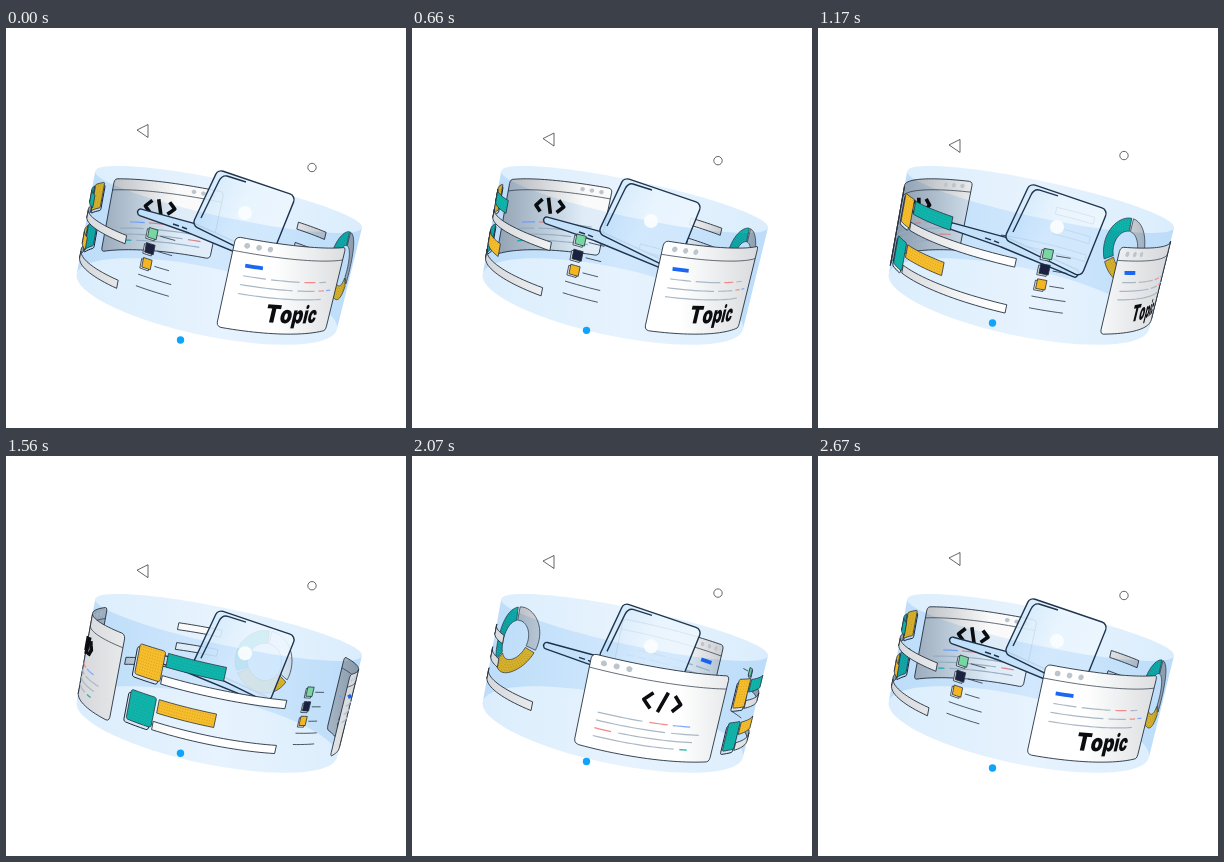
Recreate the animation shown at these times as an HTML page with a canvas. Size 400 by 400 pixels, loop 2700 ms.

```html
<!DOCTYPE html>
<html>
<head>
<meta charset="utf-8">
<style>
  html, body { margin: 0; width: 100%; height: 100%; overflow: hidden; background: #fff; }
  canvas { display: block; width: 400px; height: 400px; }
</style>
</head>
<body>
<canvas id="stage"></canvas>
<script>
const canvas = document.getElementById('stage');
const ctx = canvas.getContext('2d');
const dpr = window.devicePixelRatio || 1;
canvas.width = canvas.height = 400 * dpr;

const LOOP = 2700, RISE = 1215;
const RAD = Math.PI / 180;
const R = 133, DEPTH = 850, FLAT = 26, SKEW = 0.18;
const TILT = { cos: Math.cos(12 * RAD), sin: Math.sin(12 * RAD) };
const CENTER = { x: 212, y: 221 };
const INK = '#26323f', NAVY = '#17263f';
const TEAL = '#0fb5ac', YELLOW = '#f7bd2b', GREY = '#aab8c6', RED = '#f08a8a', BLUE = '#7fa8ff';

// Ring angle in degrees (0 = nearest) and height to stage coordinates.
function project(angle, h) {
  const a = angle * RAD;
  const psi = a + SKEW * Math.cos(a);
  const s = DEPTH / (DEPTH - R * Math.cos(psi) + 0.2 * h);
  const x = R * Math.sin(psi) * s;
  const y = (h * 0.98 + FLAT * Math.cos(psi)) * s;
  return [CENTER.x + TILT.cos * x - TILT.sin * y, CENTER.y + TILT.sin * x + TILT.cos * y];
}

const wrap = a => ((a + 180) % 360 + 360) % 360 - 180;
const toDeg = units => units / R / RAD;

// Half of the ring being drawn, and where the current item sits on it.
let side, origin;
const half = {
  front: { mid: 0, limit: 80, edge: '#d6d8db', face: '#ffffff' },
  back: { mid: 180, limit: 100, edge: '#a0a6ad', face: '#fafafa' }
};

function place(angle, middle) {
  origin = wrap(angle + toDeg(middle) - side.mid) - toDeg(middle);
}
const offset = x => origin + toDeg(x);
const visible = x => Math.abs(offset(x)) < side.limit;
function point(x, h) {
  const d = Math.max(-side.limit, Math.min(side.limit, offset(x)));
  return project(d + side.mid, h);
}

function trace(points, closed) {
  if (!points.some(p => visible(p[0]))) return false;
  ctx.beginPath();
  const last = closed ? points.length : points.length - 1;
  ctx.moveTo(...point(...points[0]));
  for (let i = 0; i < last; i++) {
    const [x0, h0] = points[i], [x1, h1] = points[(i + 1) % points.length];
    const steps = Math.max(1, Math.ceil(Math.abs(x1 - x0) / 5));
    for (let k = 1; k <= steps; k++) {
      ctx.lineTo(...point(x0 + (x1 - x0) * k / steps, h0 + (h1 - h0) * k / steps));
    }
  }
  if (closed) ctx.closePath();
  return true;
}

function shape(points, fill, stroke, width = 1) {
  if (!trace(points, true)) return;
  if (fill) { ctx.fillStyle = fill; ctx.fill(); }
  if (stroke) { ctx.strokeStyle = stroke; ctx.lineWidth = width; ctx.stroke(); }
}

function line(x0, x1, h, color, width = 1.2) {
  if (!trace([[x0, h], [x1, h]])) return;
  ctx.strokeStyle = color;
  ctx.lineWidth = width;
  ctx.stroke();
}

function box(x0, h0, x1, h1, r = 0) {
  if (!r) return [[x0, h0], [x1, h0], [x1, h1], [x0, h1]];
  const points = [];
  const corners = [[x1 - r, h0 + r, -90], [x1 - r, h1 - r, 0], [x0 + r, h1 - r, 90], [x0 + r, h0 + r, 180]];
  for (const [x, h, from] of corners) {
    for (let a = from; a <= from + 90; a += 30) {
      points.push([x + r * Math.cos(a * RAD), h + r * Math.sin(a * RAD)]);
    }
  }
  return points;
}

function arc(h, r, from, to) {
  const points = [];
  for (let a = from; a <= to; a += 5) points.push([r * Math.cos(a * RAD), h + r * Math.sin(a * RAD)]);
  return points;
}

function surface() {
  const g = ctx.createLinearGradient(76, 0, 350, 0);
  g.addColorStop(0, side.edge);
  g.addColorStop(0.35, side.face);
  g.addColorStop(0.7, side.face);
  g.addColorStop(1, side.edge);
  return g;
}

function textured(points, color, x0, x1, h0, h1) {
  shape(points, color, INK, 0.8);
  ctx.save();
  ctx.setLineDash([1, 1.6]);
  for (let h = h0 + 2; h < h1; h += 2.5) line(x0 + 1, x1 - 1, h, 'rgba(60,70,40,.28)', 0.8);
  ctx.restore();
}

function panelFrame(angle) {
  place(angle, 0);
  shape(box(-66, -40, 66, 40, 4), surface(), INK, 0.9);
  line(-66, 66, -28, INK, 0.7);
  for (const x of [-55, -44.5, -34]) shape(box(x - 2.5, -36.5, x + 2.5, -31.5, 2.5), '#bcc4cc');
}

function word(text, x, h, size) {
  ctx.font = `900 ${size}px Inter, "Liberation Sans", sans-serif`;
  ctx.fillStyle = '#0b0d10';
  for (const letter of text) {
    const w = ctx.measureText(letter).width, mid = x + w / 2;
    if (visible(mid)) {
      const p = point(mid, h), px = point(mid + 1, h), py = point(mid, h + 1);
      ctx.save();
      ctx.transform(px[0] - p[0], px[1] - p[1], py[0] - p[0], py[1] - p[1], p[0], p[1]);
      ctx.fillText(letter, -w / 2, 0);
      ctx.restore();
    }
    x += w;
  }
}

function topicPanel(angle) {
  panelFrame(angle);
  line(-53, -37, -17, '#1967f2', 3.8);
  line(-53, -32, -8, GREY);
  line(-27, 4, -8, GREY);
  line(10, 25, -8, RED);
  line(31, 42, -8, GREY);
  line(-54, -2, 0, GREY);
  line(4, 27, 0, GREY);
  line(33, 42, 0, RED);
  line(46, 54, 0, BLUE);
  line(-54, 40, 8, GREY);
  word('Topic', -25, 30, 22.5);
}

function codePanel(angle) {
  panelFrame(angle);
  const strokes = [[[-10, -18], [-17, -11], [-10, -4]], [[3, -20], [-3, -2]], [[10, -18], [17, -11], [10, -4]]];
  for (const s of strokes) {
    if (!s.every(p => visible(p[0])) || !trace(s)) continue;
    ctx.strokeStyle = '#0b0d10';
    ctx.lineWidth = 3.6;
    ctx.stroke();
  }
  line(-52, -14, 8, GREY);
  line(-8, 9, 8, RED);
  line(14, 32, 8, BLUE);
  line(-52, 8, 15, GREY);
  line(14, 44, 15, GREY);
  line(-52, -38, 22, RED);
  line(-32, 38, 22, GREY);
  line(-52, 20, 29, GREY);
  line(26, 34, 29, TEAL);
}

function list(angle) {
  place(angle, 0);
  ['#78d6a0', '#1b2140', '#f5b51f'].forEach((color, i) => {
    const h = -25 + i * 13.4;
    shape(box(-5.5, h - 3, 2.5, h + 5.5), '#e8eef4', INK, 0.8);
    shape(box(-4, h - 4.5, 4, h + 4), color, INK, 0.8);
    line(7, 20, h, INK, 0.8);
  });
  line(-6, 24, 13, INK, 0.8);
  line(-6, 24, 23.5, INK, 0.8);
}

function bars(angle) {
  place(angle, 55);
  [[-23, YELLOW, TEAL], [18, TEAL, YELLOW]].forEach(([h, icon, bar]) => {
    shape(box(-14, h - 11, 10, h + 16, 2), '#dbe7ef', NAVY, 1);
    textured(box(-12, h - 14, 12, h + 13, 2), icon, -12, 12, h - 14, h + 13);
    textured(box(14.5, h - 13, 63, h - 1), bar, 14.5, 63, h - 13, h - 1);
    shape(box(13, h + 7, 123, h + 14.5), surface(), INK, 0.9);
  });
}

function donut(angle) {
  place(angle, 0);
  const outer = 36, inner = 21.5, h = -4;
  const sector = (from, to, fill) =>
    shape([...arc(h, outer, from, to), ...arc(h, inner, from, to).reverse()], fill, INK, 0.7);
  sector(160, 270, surface());
  sector(-85, 30, TEAL);
  sector(35, 155, YELLOW);
  ctx.save();
  ctx.setLineDash([1, 1.7]);
  for (let r = inner + 3; r < outer; r += 3) {
    if (!trace(arc(h, r, -82, 152))) continue;
    ctx.strokeStyle = 'rgba(60,70,40,.28)';
    ctx.lineWidth = 1;
    ctx.stroke();
  }
  ctx.restore();
}

function rows(angle) {
  place(angle, 50);
  [[-24, 48], [-1, 46], [20.5, 102]].forEach(([h, w]) => {
    shape(box(0, h - 4, w, h + 4), surface(), INK, 0.9);
  });
}

function drawHalf(name, turn) {
  side = half[name];
  rows(130.5 + turn);
  donut(106 + turn);
  codePanel(221.5 + turn);
  topicPanel(23.5 + turn);
  list(-34 + turn);
  bars(-97.5 + turn);
}

// Tinted glass: multiplying keeps dark ink behind it crisp.
function wall(from, to) {
  ctx.beginPath();
  for (let a = from; a <= to; a += 4) ctx.lineTo(...project(a, -54));
  for (let a = to; a >= from; a -= 4) ctx.lineTo(...project(a, 50));
  ctx.closePath();
  const g = ctx.createLinearGradient(72, 0, 354, 0);
  g.addColorStop(0, '#dbedfc');
  g.addColorStop(0.5, '#e7f3fe');
  g.addColorStop(1, '#dbedfc');
  ctx.save();
  ctx.globalCompositeOperation = 'multiply';
  ctx.fillStyle = g;
  ctx.fill();
  ctx.restore();
}

function rounded(points, r) {
  const n = points.length, [a, b] = [points[n - 1], points[0]];
  ctx.beginPath();
  ctx.moveTo((a[0] + b[0]) / 2, (a[1] + b[1]) / 2);
  points.forEach((p, i) => ctx.arcTo(...p, ...points[(i + 1) % n], r));
  ctx.closePath();
}

function laptop(dy) {
  ctx.save();
  ctx.translate(0, dy);
  ctx.strokeStyle = '#20364f';
  ctx.lineWidth = 1.4;

  rounded([[131, 180], [190, 196], [262, 229], [258, 236], [183, 205], [132, 187]], 3);
  ctx.fillStyle = '#dceefb';
  ctx.fill();
  ctx.stroke();
  ctx.beginPath();
  ctx.moveTo(167, 196); ctx.lineTo(173, 198);
  ctx.moveTo(176, 199); ctx.lineTo(181, 201);
  ctx.stroke();

  rounded([[212, 141.5], [290, 168], [263, 235], [186, 197]], 6);
  const g = ctx.createLinearGradient(200, 165, 275, 200);
  g.addColorStop(0, 'rgba(212,234,251,.9)');
  g.addColorStop(0.45, 'rgba(232,244,254,.9)');
  g.addColorStop(1, 'rgba(236,246,255,.9)');
  ctx.fillStyle = g;
  ctx.fill();
  ctx.stroke();

  ctx.beginPath();
  ctx.moveTo(240, 154);
  ctx.lineTo(221, 148);
  ctx.quadraticCurveTo(216, 147, 213, 153);
  ctx.lineTo(195, 190);
  ctx.stroke();
  ctx.restore();
}

function logoDisc(dy) {
  ctx.beginPath();
  ctx.arc(239, 185 + dy, 7, 0, 7);
  ctx.fillStyle = 'rgba(252,254,255,.9)';
  ctx.fill();
}

function floaters(lift, dotLift) {
  const ty = 103 + 15 * lift;
  ctx.strokeStyle = '#333';
  ctx.lineWidth = 0.75;
  ctx.beginPath();
  ctx.moveTo(131, ty - 1);
  ctx.lineTo(142, ty - 6.5);
  ctx.lineTo(142, ty + 6.5);
  ctx.closePath();
  ctx.stroke();
  ctx.beginPath();
  ctx.arc(306, 139.5 - 12 * lift, 4.2, 0, 7);
  ctx.stroke();
  ctx.beginPath();
  ctx.arc(174.5, 312 - 17 * dotLift, 3.7, 0, 7);
  ctx.fillStyle = '#10a3fa';
  ctx.fill();
}

// Cubic Bezier easing (1, 0, .84, 1), solved by bisection.
function ease(t) {
  let lo = 0, hi = 1;
  for (let i = 0; i < 30; i++) {
    const u = (lo + hi) / 2, v = 1 - u;
    if (3 * v * v * u + 3 * v * u * u * 0.84 + u * u * u < t) lo = u; else hi = u;
  }
  return lo * lo * (3 - 2 * lo);
}

// Smooth rise, then a fall of the given length, then rest.
function bob(t, fall) {
  const phase = t < RISE ? t / RISE : Math.min(2, 1 + (t - RISE) / fall);
  return (1 - Math.cos(Math.PI * phase)) / 2;
}

function draw(time) {
  const t = time % LOOP;
  const turn = 360 * ease(t / LOOP);
  const lift = bob(t, RISE), slowLift = bob(t, LOOP - RISE);
  ctx.setTransform(dpr, 0, 0, dpr, 0, 0);
  ctx.fillStyle = '#fff';
  ctx.fillRect(0, 0, 400, 400);
  ctx.lineJoin = 'round';
  wall(80, 280);
  drawHalf('back', turn);
  laptop(14 * slowLift);
  wall(-80, 80);
  logoDisc(14 * slowLift);
  drawHalf('front', turn);
  floaters(lift, slowLift);
}

const start = performance.now();
function tick() {
  draw(performance.now() - start);
  requestAnimationFrame(tick);
}
tick();
</script>
</body>
</html>
```
